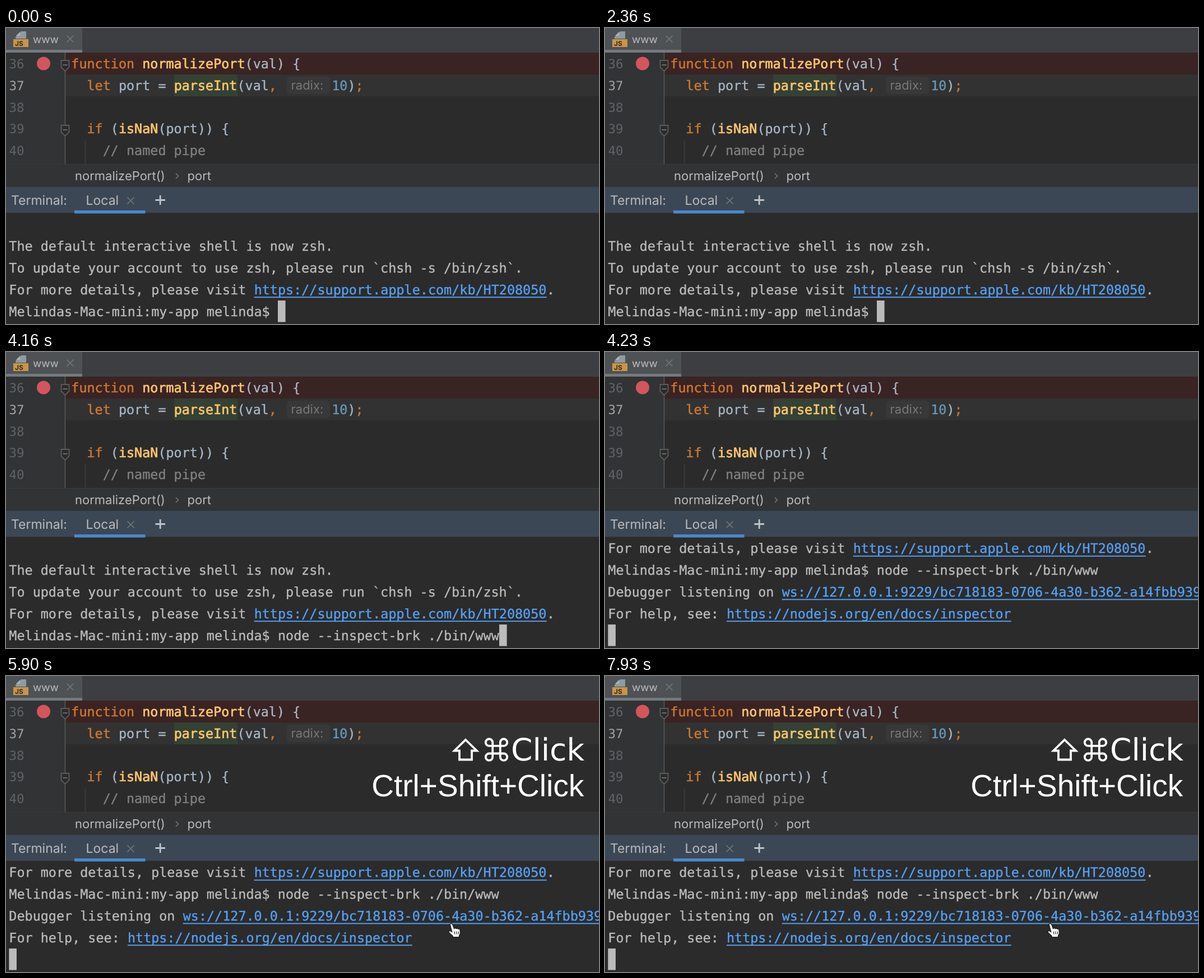
An HTML page for the animation above (8000 ms loop, 1058x529 px).

```html
<!DOCTYPE html>
<html lang="en">
<head>
<meta charset="utf-8">
<title>Debugging from the terminal</title>
<style>
  html, body { margin: 0; width: 100%; height: 100%; overflow: hidden; background: #2b2b2b; }
  svg { display: block; width: 1058px; height: 529px; }
  text { white-space: pre; text-rendering: geometricPrecision; }
  .mono { font: 23.43px "DejaVu Sans Mono", monospace; fill: #a9b7c6; stroke: #a9b7c6; stroke-width: .35; }
  .mono.num { font-size: 22.5px; fill: #606366; stroke: none; }
  .mono .key { fill: #cc7832; stroke: #cc7832; stroke-width: .5; }
  .mono .fn { fill: #ffc66d; stroke: #ffc66d; stroke-width: .7; }
  .mono .punct { fill: #cc7832; stroke: #cc7832; }
  .mono .value { fill: #6897bb; stroke: #6897bb; }
  .mono .note { fill: #808080; stroke: #808080; }
  .mono.term { fill: #bbb; stroke: #bbb; }
  .mono.link { fill: #56a1f6; stroke: #56a1f6; }
  .underline { fill: #56a1f6; }
  .ui { font-family: Inter, sans-serif; fill: #bbb; }
  .line { fill: none; stroke: #747678; stroke-width: 1.6; }
</style>
</head>
<body>
<svg viewBox="0 0 1058 529">
  <defs>
    <g id="fold">
      <path d="M-7-9H7V3L0 10L-7 3Z" fill="#2b2b2b" stroke="#6a6a6a" stroke-width="1.4"/>
      <path d="M-4-1H4" stroke="#7c7c7c" stroke-width="1.6"/>
    </g>
    <path id="close" class="line" d="M-6-6L6 6M6-6L-6 6"/>
  </defs>

  <!-- editor tabs -->
  <rect width="1058" height="44" fill="#3d3e42"/>
  <rect width="136" height="44" fill="#4e5254"/>
  <rect y="39" width="136" height="5" fill="#747a80"/>
  <path d="M27 6H36V19H17V16Z" fill="#8f9ba3"/>
  <path d="M25 7V14H18Z" fill="#aab4ba"/>
  <rect x="13" y="20" width="27" height="14" fill="#c9954a"/>
  <text class="ui" x="16" y="32" font-size="12" font-weight="700" style="fill:#3a2d17">JS</text>
  <text class="ui" x="48" y="27" font-size="18.7">www</text>
  <use href="#close" x="114.5" y="19.5"/>

  <!-- editor -->
  <rect y="44" width="106" height="200" fill="#313335"/>
  <rect x="106" y="44" width="952" height="39" fill="#3a2323"/>
  <rect x="106" y="83" width="952" height="39" fill="#323232"/>
  <rect x="300" y="83" width="113" height="39" fill="#344134"/>
  <path d="M105.5 44V244" stroke="#5a5b5c" stroke-width="1.4"/>
  <path d="M141.5 200V244" stroke="#3d3d3d" stroke-width="1.6"/>
  <circle cx="67" cy="63.6" r="12" fill="#d3555d"/>
  <use href="#fold" x="105.5" y="67"/>
  <use href="#fold" x="105.5" y="183"/>
  <g class="mono num">
    <text x="5.5" y="72">36</text>
    <text x="5.5" y="110.8" fill="#a4a3a3">37</text>
    <text x="5.5" y="149.6">38</text>
    <text x="5.5" y="188.4">39</text>
    <text x="5.5" y="227.2">40</text>
  </g>
  <g class="mono">
    <text x="116.3" y="72"><tspan class="key">function</tspan> <tspan class="fn">normalizePort</tspan>(val) {</text>
    <text x="144.5" y="110.8"><tspan class="key">let</tspan> port = <tspan class="fn">parseInt</tspan>(val<tspan class="punct">,</tspan></text>
    <text x="581.2" y="110.8"><tspan class="value">10</tspan>)<tspan class="punct">;</tspan></text>
    <text x="144.5" y="188.4"><tspan class="key">if</tspan> (<tspan class="fn">isNaN</tspan>(port)) {</text>
    <text x="172.7" y="227.2" class="note">// named pipe</text>
  </g>
  <rect x="501" y="87" width="77" height="31" rx="6" fill="#383838"/>
  <text class="ui" x="508.5" y="110" font-size="22" style="fill:#787878">radix:</text>

  <!-- breadcrumbs -->
  <rect y="243" width="1058" height="41" fill="#313335"/>
  <path d="M0 243.5H1058" stroke="#3b3c3d"/>
  <text class="ui" x="123" y="272" font-size="22">normalizePort()</text>
  <path class="line" d="M303 260L307.5 264.5L303 269"/>
  <text class="ui" x="323.5" y="272" font-size="22">port</text>

  <!-- terminal header -->
  <rect y="284" width="1058" height="46" fill="#3c4756"/>
  <rect y="330" width="1058" height="1" fill="#323232"/>
  <rect x="122" y="326" width="126.5" height="5.5" fill="#4a88c7"/>
  <text class="ui" x="9" y="315.6" font-size="23">Terminal:</text>
  <text class="ui" x="142.5" y="315.6" font-size="23">Local</text>
  <use href="#close" x="222.5" y="308.5"/>
  <path d="M266.5 307.5H284M275.2 299V316" stroke="#c0c4c8" stroke-width="2.8"/>

  <g id="intro"></g>
  <g id="running"></g>
  <rect id="caret" y="487" width="13.6" height="38.5" fill="#bbb"/>

  <g id="hint">
    <g fill="none" stroke="#fff" stroke-width="3.8">
      <path d="M820 114L840 133.5H831V149.5H809V133.5H800Z"/>
      <path d="M862 124.9a6.2 6.2 0 1 1 6.2-6.2v26a6.2 6.2 0 1 1-6.2-6.2h26a6.2 6.2 0 1 1-6.2 6.2v-26a6.2 6.2 0 1 1 6.2 6.2z"/>
    </g>
    <g fill="#fff" font-size="55">
      <text x="901" y="151" font-family="DejaVu Sans, sans-serif">Click</text>
      <text x="652.3" y="215" font-family="Liberation Sans, Arial, sans-serif">Ctrl+Shift+Click</text>
    </g>
    <g transform="translate(-1.5 -1)">
      <path d="M793.5 444.5q3-3 5 1l2.5 7q2-2 4 0q2.5-1.5 3.5 .8q2.6-1 3 1.4l.6 5q0 3-2 5v3h-11l-1-2.5-5.5-5q-2.5-4 1-4l3.5 2z" fill="#fff" stroke="#222" stroke-width="1.5"/>
      <path d="M801.5 457.5l.8 5M805 457.5l.6 5M808.5 457.5l.3 5" stroke="#333" stroke-width="1.3"/>
    </g>
  </g>
</svg>
<script>
const CELL = 14.107, LEFT = 5.35, TOP = 359.4, ROW = 38.8, LOOP = 8000;
const byId = id => document.getElementById(id);
const colX = col => LEFT + col * CELL;
const rowY = row => TOP + row * ROW;

function add(parent, tag, attrs, content = "") {
  const el = document.createElementNS("http://www.w3.org/2000/svg", tag);
  for (const name in attrs) el.setAttribute(name, attrs[name]);
  el.textContent = content;
  return parent.appendChild(el);
}

const addText = (parent, row, col, str, kind) =>
  add(parent, "text", { x: colX(col), y: rowY(row), class: "mono " + kind }, str);

// A row is plain text, optionally followed by a link and a tail.
function addRow(parent, row, text, link = "", tail = "") {
  addText(parent, row, 0, text, "term");
  if (!link) return;
  const start = text.length;
  addText(parent, row, start, link, "link");
  addText(parent, row, start + link.length, tail, "term");
  add(parent, "rect", { x: colX(start), y: rowY(row) + 4.4, width: link.length * CELL, height: 1.9, class: "underline" });
}

const prompt = "Melindas-Mac-mini:my-app melinda$ ";
const command = "node --inspect-brk ./bin/www";
const details = ["For more details, please visit ", "https://support.apple.com/kb/HT208050", "."];
const intro = byId("intro"), running = byId("running"), hint = byId("hint"), caret = byId("caret");

addRow(intro, 1, "The default interactive shell is now zsh.");
addRow(intro, 2, "To update your account to use zsh, please run `chsh -s /bin/zsh`.");
addRow(intro, 3, ...details);
addRow(intro, 4, prompt);
const typed = addText(intro, 4, prompt.length, command, "term");

addRow(running, 0, ...details);
addRow(running, 1, prompt + command);
addRow(running, 2, "Debugger listening on ", "ws://127.0.0.1:9229/bc718183-0706-4a30-b362-a14fbb939");
addRow(running, 3, "For help, see: ", "https://nodejs.org/en/docs/inspector");

const TYPED = 2630, STARTED = 4230, HINT = 5900;
// [start time, caret visible]
const blinks = [
  [0, 1], [830, 0], [1360, 1], [1860, 0], [2360, 1], [TYPED, 0], [3130, 1], [3630, 0], [4160, 1],
  [4760, 0], [5300, 1], [5830, 0], [HINT, 1], [6400, 0], [6930, 1], [7430, 0], [7930, 1]
];

const show = (el, on) => el.setAttribute("visibility", on ? "visible" : "hidden");

function draw(t) {
  const started = t >= STARTED, entered = t >= TYPED;
  show(intro, !started);
  show(typed, entered && !started);
  show(running, started);
  show(hint, t >= HINT);
  const col = started ? 0 : prompt.length + (entered ? command.length : 0);
  caret.setAttribute("x", colX(col));
  show(caret, blinks.findLast(([start]) => t >= start)[1]);
}

const begin = performance.now();
function tick() {
  draw((performance.now() - begin) % LOOP);
  requestAnimationFrame(tick);
}
tick();
</script>
</body>
</html>
```
